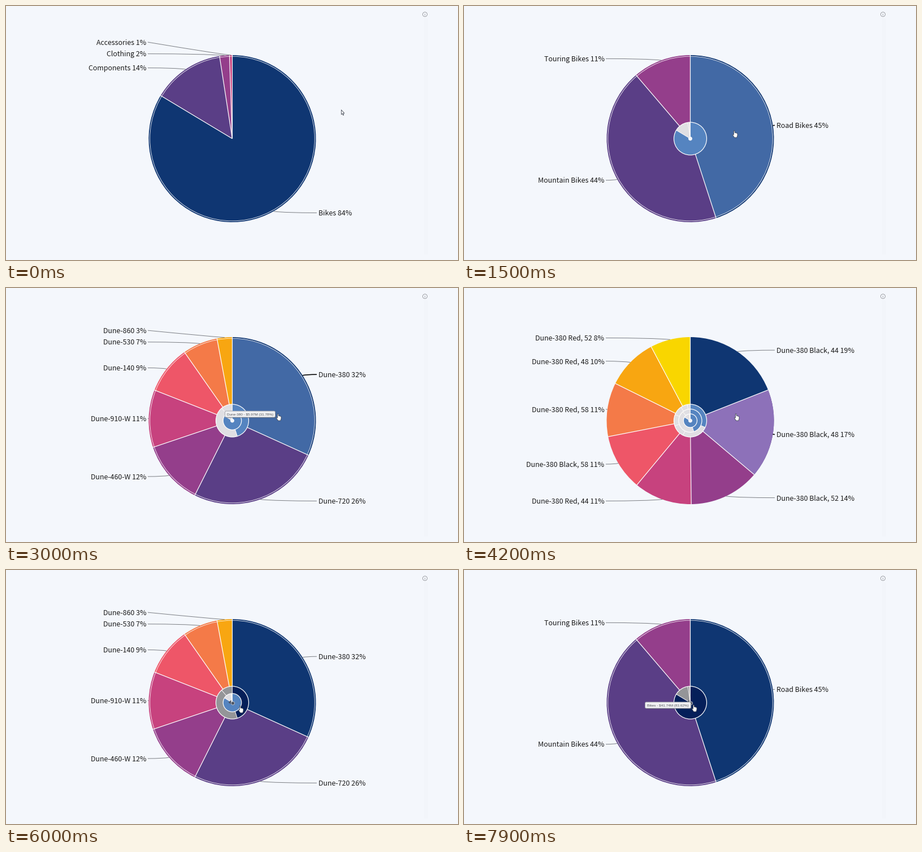
Animation of 800 by 450 pixels, one loop 8 s. Source, as a matplotlib script:

```python
import numpy as np
import matplotlib.pyplot as plt
from matplotlib.animation import FuncAnimation
from matplotlib.colors import to_rgb
from matplotlib.patches import Circle, FancyBboxPatch, PathPatch, Polygon, Rectangle, Wedge
from matplotlib.path import Path

W, H, DPI = 800, 450, 100
STEP, FRAMES = 100, 80
PX = 72 / DPI
CX, CY, R, HUB, DOT = 400.5, 235, 148, 29, 3.5
BG = "#f4f7fc"
COLORS = ["#0f3672", "#5a3e86", "#943e8b", "#c7427e",
          "#ee5668", "#f47a48", "#f8a611", "#f9d600"]

# Each level: slice names and the percentage at which each slice ends.
LEVELS = [
    (["Bikes 84%", "Components 14%", "Clothing 2%", "Accessories 1%"],
     [83.62, 97.56, 99.46, 100]),
    (["Road Bikes 45%", "Mountain Bikes 44%", "Touring Bikes 11%"],
     [45.01, 88.76, 100]),
    (["Dune-380 32%", "Dune-720 26%", "Dune-460-W 12%", "Dune-910-W 11%",
      "Dune-140 9%", "Dune-530 7%", "Dune-860 3%"],
     [31.78, 57.4, 69.83, 80.96, 90.3, 97.07, 100]),
    (["Dune-380 Black, 44 19%", "Dune-380 Black, 48 17%",
      "Dune-380 Black, 52 14%", "Dune-380 Red, 44 11%",
      "Dune-380 Black, 58 11%", "Dune-380 Red, 58 11%",
      "Dune-380 Red, 48 10%", "Dune-380 Red, 52 8%"],
     [19.01, 36.17, 49.82, 61.02, 71.93, 82.33, 92.26, 100]),
]
EDGES = [np.array([0] + ends) / 100 for _, ends in LEVELS]
# Clicks: start, duration, level before, level after.
MOVES = [(0.4, 0.45, 0, 1), (1.95, 0.55, 1, 2), (3.1, 0.45, 2, 3),
         (5.4, 0.5, 3, 2), (6.75, 0.5, 2, 1)]
TRAIL = [(0, 596, 189), (0.35, 480, 228), (1.5, 480, 227), (1.9, 480, 227),
         (2.6, 483, 229), (4.45, 483, 229), (5.0, 416, 247),
         (7.2, 416, 247), (7.6, 408, 245), (8.0, 408, 245)]
TIPS = [(2.75, 3.1, "Dune-380 - $5.97M (31.78%)", 89),
        (7.65, 8.0, "Bikes - $41.74M (83.62%)", 81)]
HAND = [(-2.5, -6), (-1, -6), (-0.6, -2.4), (2.4, -2), (4, -0.8), (4, 2.6),
        (2.8, 6), (-1.4, 6), (-4.4, 1.6), (-4, 0.4), (-2.6, 1.2)]
ARROW = [(-2.5, -5), (-2.5, 3.2), (-0.7, 1.6), (0.7, 4.6), (1.8, 4),
         (0.6, 1.2), (2.9, 1)]

fig = plt.figure(figsize=(W / DPI, H / DPI), dpi=DPI, facecolor=BG)
ax = fig.add_axes([0, 0, 1, 1])


def ease(p):
    p = np.clip(p, 0, 1)
    return p * p * (3 - 2 * p)


def mix(a, b, p):
    return tuple(np.array(to_rgb(a)) * (1 - p) + np.array(to_rgb(b)) * p)


def lighten(color):
    return tuple(np.clip(np.array(to_rgb(color)) + 0.2, 0, 1))


def polar(r, frac):
    a = 2 * np.pi * frac
    return CX + r * np.sin(a), CY - r * np.cos(a)


def sector(r0, r1, f0, f1, color):
    if f1 - f0 > 1e-4 and r1 - r0 > 0.05:
        ax.add_patch(Wedge((CX, CY), r1, f0 * 360 - 90, f1 * 360 - 90,
                           width=r1 - r0, fc=color, lw=0))


def spoke(r0, r1, frac, width=1.2):
    # Same zorder as the patches, so the hub covers the pie's spokes.
    (x0, y0), (x1, y1) = polar(r0, frac), polar(r1, frac)
    ax.plot([x0, x1], [y0, y1], color="white", lw=width * PX, zorder=1,
            snap=False, solid_capstyle="butt")


def ring(r, width, alpha=1):
    ax.add_patch(Circle((CX, CY), r, fill=False, ec="white",
                        lw=width * PX, alpha=alpha))


def text(x, y, s, size, font="Noto Sans CJK JP", color="#1c1c1c", **kw):
    ax.text(x, y, s, fontsize=size * PX, family=font, color=color,
            zorder=1, **kw)


def state(t):
    """Lower level, progress towards the next one, label opacity."""
    level, shown = 0, -1
    for start, dur, a, b in MOVES:
        if t < start - 1e-6:
            break
        if t < start + dur - 1e-6:
            p = ease((t - start) / dur)
            return min(a, b), p if b > a else 1 - p, 0
        level, shown = b, start + dur
    return level, 0, np.clip((t - shown + 0.05) / 0.15, 0, 1)


def pointer(t):
    for (t0, x0, y0), (t1, x1, y1) in zip(TRAIL, TRAIL[1:]):
        if t <= t1:
            p = ease((t - t0) / (t1 - t0))
            return x0 + (x1 - x0) * p, y0 + (y1 - y0) * p


def draw_pie(level, p, hover):
    edges = EDGES[level]
    if p > 0:
        # The first slice opens to the whole circle and splits into children.
        open_to = edges[1] + (1 - edges[1]) * p
        kids = EDGES[level + 1] * open_to
        rest = open_to + (edges[1:] - edges[1]) * (1 - p)
        tints = [mix(COLORS[0], c, p) for c in COLORS[:len(kids) - 1]]
        slices = list(zip(kids, kids[1:], tints))
        slices += list(zip(rest, rest[1:], COLORS[1:]))
    else:
        slices = list(zip(edges, edges[1:], COLORS))
    leaf = level + (p > 0.99) == 3
    for i, (a, b, color) in enumerate(slices):
        sector(0, R, a, b, color)
        if i == hover:
            sector(0, R if leaf else R - 2, a, b, lighten(color))
    if not leaf:
        ring(R - 2.2, 0.9, 0.85)
    for a, b, _ in slices:
        if b - a > 1e-4:
            spoke(0, R, a, 1.2 if p == 0 else 1.2 * max(p, 0.4))


def draw_hub(level, p, hovered):
    count = level + (p > 0)
    if not count:
        return
    scale = p if level == 0 and p > 0 else 1
    bounds = [scale * (DOT + (HUB - DOT) * min(1, k / (level + p)))
              for k in range(count + 1)]
    for k in range(count):
        edges, dark = EDGES[k], hovered and k == count - 1
        on, off = ("#051f59", "#949598") if dark else ("#5584c0", "#e0dfe3")
        inner = 0 if k == 0 else bounds[k]
        for i, (a, b) in enumerate(zip(edges, edges[1:])):
            sector(inner, bounds[k + 1], a, b, off if i else on)
        for a in edges[:-1]:
            spoke(inner, bounds[k + 1], a, 0.9)
    for b in bounds[1:]:
        ring(b, 1.2)
    if hovered:
        ax.add_patch(Polygon([(393.5, 234.5), (398.5, 230.5), (398.5, 238)],
                             fc="#4c5464", lw=0))
        ax.add_patch(Circle((401.5, 236), 3, fc="#4c5464", ec="#c9d0da",
                            lw=0.8 * PX))
    else:
        ax.add_patch(Circle((CX, CY), DOT * scale, fc="#f4f6fa", lw=0))


def draw_labels(level, alpha, hover):
    names, edges = LEVELS[level][0], EDGES[level]
    mids = (edges[:-1] + edges[1:]) / 2
    last = None
    for i, (name, m) in enumerate(zip(names, mids)):
        x, y = polar(R, m)
        ly = polar(R + 3, m)[1]
        right = m < 0.5
        if not right:
            if last is not None:
                ly = min(ly, last - 20.6)
            last = ly
        lx = 550 if right else 251
        near = abs(ly - y) <= 4.5
        ctrl = (x + (lx - x) * 0.28, ly) if near else \
            (x + (lx - x) * 0.15, y + (ly - y) * 0.09)
        bold = i == hover
        ax.add_patch(PathPatch(
            Path([(lx, ly), ctrl, (x, y)], [Path.MOVETO, Path.CURVE3, Path.CURVE3]),
            fill=False, ec="black" if bold else "#7d8085",
            lw=(1.6 if bold else 1) * PX, alpha=alpha))
        text(553 if right else 248.5, ly + 4.6, name, 12.4, alpha=alpha,
             ha="left" if right else "right", va="baseline")


def draw_tip(t, x, y):
    for start, end, words, width in TIPS:
        if start <= t <= end:
            left, top = x - 6.5 - width, y - 11
            for d, fc, ec, a in ((1.3, "#50545c", "none", 0.45),
                                 (0, "#f0f0f2", "#9a9ca2", 1)):
                ax.add_patch(FancyBboxPatch(
                    (left + d, top + d), width, 11, fc=fc, ec=ec, alpha=a,
                    boxstyle="round,pad=0,rounding_size=2", lw=0.8 * PX))
            text(left + width / 2, top + 7.8, words, 6.4, "Liberation Sans",
                 "#55585e", ha="center", va="baseline")


def draw_pointer(t, x, y, over):
    if any(abs(t - m[0]) < 0.06 for m in MOVES):
        ax.add_patch(Circle((x - 1.5, y - 6), 3, fc="#2fd0a0", lw=0))
    shape = np.array(HAND if over else ARROW) + (x, y)
    ax.add_patch(Polygon(shape, fc="white", ec="#3d4350", lw=0.8 * PX,
                         joinstyle="round"))


def draw_page():
    ax.add_patch(Rectangle((740, 22), 7, 418, fc="#f2f5fa", lw=0))
    ax.add_patch(Circle((741.5, 14.8), 4, fill=False, ec="#8b8d92", lw=0.8 * PX))
    text(741.5, 17.2, "i", 6.5, "Liberation Sans", "#77797e",
         ha="center", va="baseline")


def draw(n):
    ax.clear()
    ax.set(xlim=(0, W), ylim=(H, 0))
    ax.axis("off")
    t = n * STEP / 1000
    level, p, alpha = state(t)
    x, y = pointer(t)
    dist = np.hypot(x - CX, y - CY)
    over, on_hub = dist < R, dist < HUB
    hover = None
    if p == 0 and over and not on_hub:
        frac = np.arctan2(x - CX, CY - y) / (2 * np.pi) % 1
        hover = int(np.searchsorted(EDGES[level], frac)) - 1
    draw_page()
    draw_pie(level, p, hover)
    draw_hub(level, p, on_hub)
    if alpha > 0:
        draw_labels(level, alpha, hover)
    draw_tip(t, x, y)
    draw_pointer(t, x, y, over)
    return []


anim = FuncAnimation(fig, draw, frames=FRAMES, interval=STEP,
                     init_func=lambda: [], repeat=True, repeat_delay=0)
plt.show()
```
